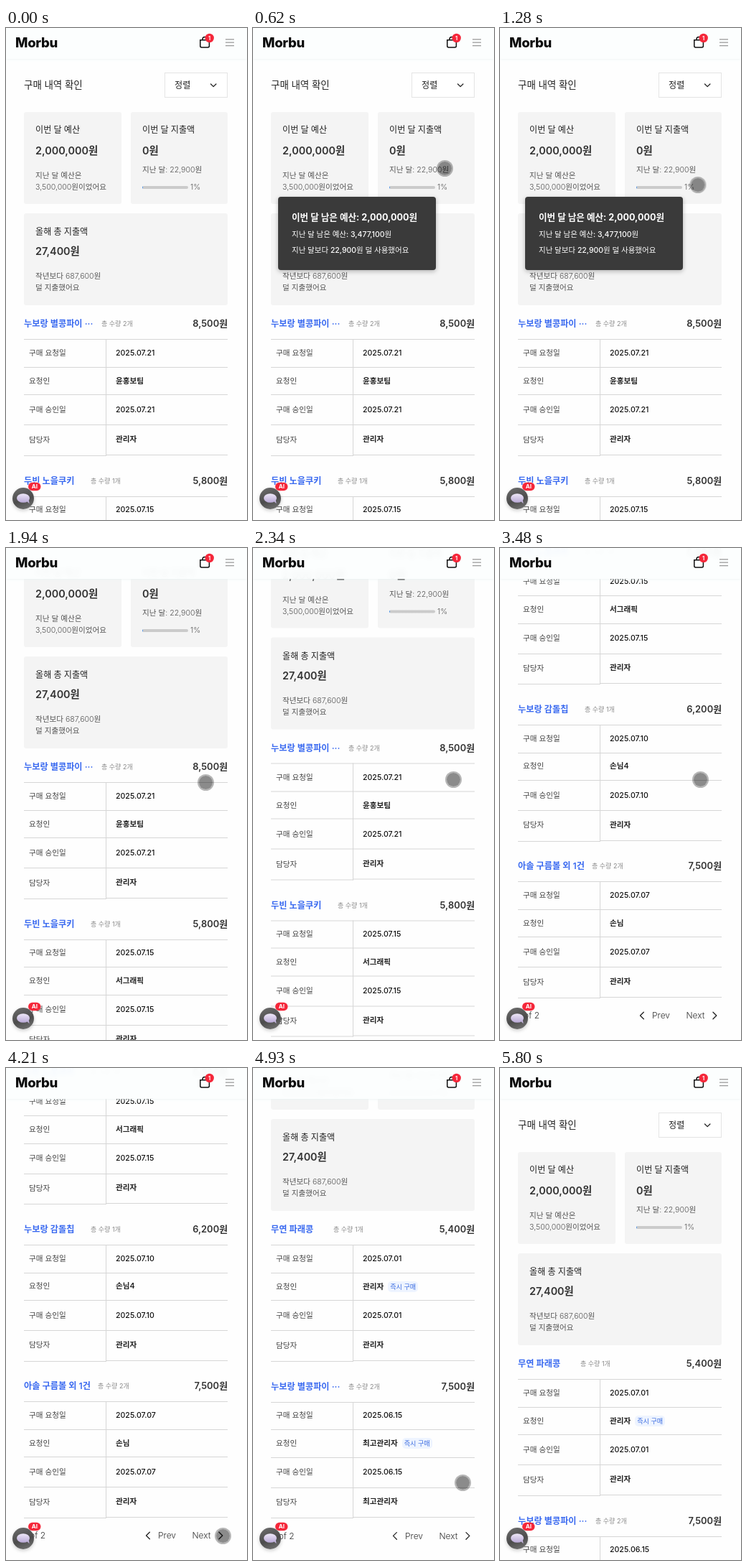
An HTML page that plays this animation: 336x685 px, repeating every 5.86 s.

```html
<!DOCTYPE html>
<html lang="ko">
<head>
<meta charset="utf-8">
<title>구매 내역</title>
<style>
  :root { --loop: 5860ms; }
  html, body { margin: 0; width: 100%; height: 100%; overflow: hidden; background: #fff; }
  body { font-family: Inter, "Noto Sans CJK KR", "Noto Sans CJK JP", "Noto Sans CJK", sans-serif; color: #222; }
  .stage { position: absolute; left: 0; top: 0; width: 336px; height: 685px; overflow: hidden; background: #fefefe; }
  .stage * { position: absolute; box-sizing: border-box; }

  .doc { left: 0; top: 0; width: 336px; height: 1309px; animation: scroll var(--loop) infinite; }
  .page { left: 0; top: 0; width: 336px; height: 1309px; }
  .one { animation: first var(--loop) step-end infinite; }
  .two { animation: second var(--loop) step-end infinite; }

  .t { line-height: 20px; margin-top: -10px; white-space: pre; font-size: 10.6px; font-weight: 400; }
  .title { font-size: 13.5px; font-weight: 500; }
  .label { font-size: 12.1px; font-weight: 500; }
  .sum { font-size: 14.4px; font-weight: 600; color: #333; }
  .note { font-weight: 300; color: #555; }
  .name { font-size: 12.2px; font-weight: 600; color: #3a6af0; }
  .qty { font-size: 9px; color: #8a8a8a; }
  .price { font-size: 12.9px; font-weight: 600; color: #333; }
  .key { font-weight: 300; color: #444; }
  .val { font-weight: 500; color: #111; }
  .who { font-weight: 600; color: #222; }
  .nav { font-size: 12px; font-weight: 300; color: #333; }
  .tag { position: static; display: inline-block; margin-left: 6px; padding: 0 3px; border-radius: 5px;
         line-height: 15px; font-size: 9.1px; font-weight: 500; background: #eef4ff; color: #3a6be0; }
  .card { background: #f4f4f4; border-radius: 3px; }
  .line { background: #d6d6d6; }
  .sort { left: 221px; top: 62px; width: 88px; height: 35px; border: 1px solid #e4e4e4; background: #fff; }

  .tip { left: 35px; top: 235px; width: 220px; height: 102px; border-radius: 4px; background: #3a3a3a;
         box-shadow: 0 2px 6px #0004; animation: tip var(--loop) step-end infinite; }
  .tip .t { color: #fff; font-size: 10.5px; font-weight: 500; }
  .tip .head { font-size: 12.6px; font-weight: 700; }

  .bar { left: 0; top: 0; width: 336px; height: 43px; background: #fcfefef4; backdrop-filter: blur(3px);
         box-shadow: 0 0 4px #e9f3f3; }
  .brand { left: 13px; top: 20px; font-size: 18.5px; font-weight: 800; letter-spacing: -.3px; color: #0b0b0b; }
  svg { left: 0; top: 0; width: 336px; height: 685px; overflow: visible; fill: none; }
  svg text { font-weight: 700; fill: #fff; text-anchor: middle; }
  .chat { left: 9px; top: 640px; width: 30px; height: 30px; border-radius: 50%;
          background: linear-gradient(160deg, #6e6e6e, #4c4c4c 55%, #777); box-shadow: 0 2px 5px #0003; }
  .touch { left: -11.5px; top: -11.5px; width: 23px; height: 23px; border-radius: 50%;
           border: 2px solid #00000048; background: #00000073; background-clip: padding-box;
           animation: touch var(--loop) infinite; }

  @keyframes scroll {
    0%     { transform: translateY(0); animation-timing-function: step-end; }
    33.1%  { transform: translateY(-107px); animation-timing-function: step-end; }
    38.9%  { transform: translateY(-107px); animation-timing-function: steps(3, jump-both); }
    42.3%  { transform: translateY(-213px); animation-timing-function: step-end; }
    44.87% { transform: translateY(-213px); animation-timing-function: steps(3, jump-both); }
    48.28% { transform: translateY(-427px); animation-timing-function: step-end; }
    53.74% { transform: translateY(-427px); animation-timing-function: steps(4, jump-both); }
    58.18% { transform: translateY(-624px); animation-timing-function: step-end; }
    75.25% { transform: translateY(-187px); animation-timing-function: step-end; }
    85.31% { transform: translateY(-187px); animation-timing-function: steps(7, jump-both); }
    94.36% { transform: translateY(-6px); animation-timing-function: step-end; }
    95.55% { transform: translateY(-6px); animation-timing-function: steps(2, jump-both); }
    98.96%, 100% { transform: translateY(0); }
  }
  @keyframes first  { 0% { visibility: visible; } 75.25%, 100% { visibility: hidden; } }
  @keyframes second { 0% { visibility: hidden; } 75.25%, 100% { visibility: visible; } }
  @keyframes tip    { 0% { visibility: hidden; } 5.83% { visibility: visible; } 23.03%, 100% { visibility: hidden; } }
  @keyframes touch {
    0%     { transform: translate(348px, 150px); animation-timing-function: step-end; }
    1.19%  { transform: translate(348px, 150px); animation-timing-function: steps(5, jump-both); }
    6.99%  { transform: translate(284px, 190px); animation-timing-function: step-end; }
    9.55%  { transform: translate(272px, 194px); animation-timing-function: step-end; }
    10.57% { transform: translate(267px, 195px); animation-timing-function: step-end; }
    12.79% { transform: translate(267px, 195px); animation-timing-function: steps(5, jump-both); }
    18.42% { transform: translate(275px, 200px); animation-timing-function: step-end; }
    20.81% { transform: translate(275px, 200px); animation-timing-function: steps(6, jump-both); }
    27.46% { transform: translate(278px, 326px); animation-timing-function: step-end; }
    38.9%  { transform: translate(279px, 322px); animation-timing-function: step-end; }
    60.57% { transform: translate(279px, 322px); animation-timing-function: steps(2, jump-both); }
    62.79% { transform: translate(285px, 400px); animation-timing-function: step-end; }
    64.16% { transform: translate(285px, 400px); animation-timing-function: steps(7, jump-both); }
    71.84% { transform: translate(302px, 651px); animation-timing-function: step-end; }
    75.25% { transform: translate(302px, 651px); animation-timing-function: steps(8, jump-both); }
    84.12% { transform: translate(292px, 577px); animation-timing-function: step-end; }
    98.96%, 100% { transform: translate(360px, 577px); }
  }
</style>
</head>
<body>
<div class="stage">
  <div class="doc">
    <div class="sort"></div>
    <div id="top"></div>
    <div class="page one"></div>
    <div class="page two"></div>
    <div class="tip">
      <span class="t head" style="left:19px;top:28.5px">이번 달 남은 예산:</span>
      <span class="t head" style="right:26px;top:28.5px">2,000,000원</span>
      <span class="t" style="left:19px;top:53px">지난 달 남은 예산: 3,477,100원</span>
      <span class="t" style="left:19px;top:75px">지난 달보다 22,900원 덜 사용했어요</span>
    </div>
  </div>

  <div class="bar">
    <span class="t brand">Morbu</span>
    <svg>
      <path d="M270.8 16.7h12.6v8.4q0 1.9-1.9 1.9h-8.8q-1.9 0-1.9-1.9zM274 16.5v-.8a3.1 3.1 0 0 1 6.2 0v.8" stroke="#111" stroke-width="1.5"/>
      <circle cx="283.7" cy="14" r="6.2" fill="#f5273a"/>
      <text x="283.7" y="16.8" font-size="7.5">1</text>
      <path d="M306 15.8h12M306 20.2h12M306 24.6h12" stroke="#999" stroke-width="1.2"/>
    </svg>
  </div>

  <div class="chat"></div>
  <svg>
    <linearGradient id="lilac" x2="0" y2="1"><stop stop-color="#eee8f8"/><stop offset="1" stop-color="#b9a9d6"/></linearGradient>
    <path d="M28 658l4.6 4.2-1-6z" fill="#c3b5dd"/>
    <ellipse cx="24" cy="654.5" rx="9" ry="6.3" fill="url(#lilac)"/>
    <rect x="31" y="632.7" width="17.5" height="11.6" rx="5.8" fill="#f5273a"/>
    <text x="39.8" y="641.4" font-size="8">AI</text>
  </svg>
  <div class="touch"></div>
</div>

<script>
  const text = (x, y, cls, s) => `<span class="t ${cls}" style="left:${x}px;top:${y}px">${s}</span>`;
  const box = (x, y, w, h, cls, extra = '') =>
    `<div class="${cls}" style="left:${x}px;top:${y}px;width:${w}px;height:${h}px;${extra}"></div>`;
  const chevron = d => `<svg><path d="${d}" stroke="#222" stroke-width="1.3" stroke-linecap="round" stroke-linejoin="round"/></svg>`;

  document.getElementById('top').innerHTML =
    text(25, 79, 'title', '구매 내역 확인') +
    text(235, 79.5, 'label', '정렬') + chevron('M285.5 78l3.7 3.6 3.7-3.6') +
    box(25, 117, 136, 127.5, 'card') + box(174, 117, 135, 127.5, 'card') + box(25, 258, 284, 127.5, 'card') +
    text(41, 142, 'label', '이번 달 예산') + text(41, 171, 'sum', '2,000,000원') +
    text(41, 206, 'note', '지난 달 예산은') + text(41, 222, 'note', '3,500,000원이었어요') +
    text(190, 142, 'label', '이번 달 지출액') + text(190, 171, 'sum', '0원') +
    text(190, 198, 'note', '지난 달: 22,900원') +
    box(190, 219.5, 64, 4.5, '', 'border-radius:3px;background:linear-gradient(90deg,#4a90e2 1.2px,#cbcbcb 1.2px)') +
    text(257, 222, 'note', '1%') +
    text(41, 283.5, 'label', '올해 총 지출액') + text(41, 311, 'sum', '27,400원') +
    text(41, 346, 'note', '작년보다 687,600원') + text(41, 361.5, 'note', '덜 지출했어요');

  const STEP = 218.3, KEYS = ['구매 요청일', '요청인', '구매 승인일', '담당자'];
  const ROWS = [40.7, 79.4, 119.7, 161.4], LINES = [21, 59.6, 97.9, 140.1];
  const TAG = '<span class="tag">즉시 구매</span>';

  function order([name, qtyX, qty, price, date, buyer, manager], i) {
    const y = 412.3 + STEP * i;
    const vals = [date, buyer, date, manager];
    return text(25, y, 'name', name) + text(qtyX, y, 'qty', `총 수량 ${qty}개`) +
      `<span class="t price" style="right:27px;top:${y}px">${price}원</span>` +
      LINES.map(l => box(25, y + l, 284, 1, 'line')).join('') +
      box(25, y + 182.6, 115, 1, 'line') + box(140, y + 181.6, 169, 1, 'line') +
      box(139.4, y + 21, 1, 162.6, 'line') +
      ROWS.map((r, k) => text(32, y + r, 'key', KEYS[k]) +
        text(153, y + r - (k === 3 ? .8 : 0), k % 2 ? 'who' : 'val', vals[k])).join('');
  }

  function page(cls, n, orders) {
    const y = 402 + STEP * orders.length;
    document.querySelector(cls).innerHTML = orders.map(order).join('') +
      text(25, y, 'nav', `${n} of 2`) + text(212, y, 'nav', 'Prev') + text(259.5, y, 'nav', 'Next') +
      chevron(`M200.3 ${y - 5}l-4.8 4.8 4.8 4.8M297 ${y - 5}l4.8 4.8-4.8 4.8`);
  }

  page('.one', 1, [
    ['누보랑 별콩파이 ···', 133, 2, '8,500', '2025.07.21', '윤홍보팀', '관리자'],
    ['두빈 노을쿠키', 118, 1, '5,800', '2025.07.15', '서그래픽', '관리자'],
    ['누보랑 감돌칩', 118, 1, '6,200', '2025.07.10', '손님4', '관리자'],
    ['아솔 구름볼 외 1건', 128, 2, '7,500', '2025.07.07', '손님', '관리자']
  ]);
  page('.two', 2, [
    ['무연 파래콩', 112, 1, '5,400', '2025.07.01', '관리자' + TAG, '관리자'],
    ['누보랑 별콩파이 ···', 133, 2, '7,500', '2025.06.15', '최고관리자' + TAG, '최고관리자']
  ]);
</script>
</body>
</html>
```
